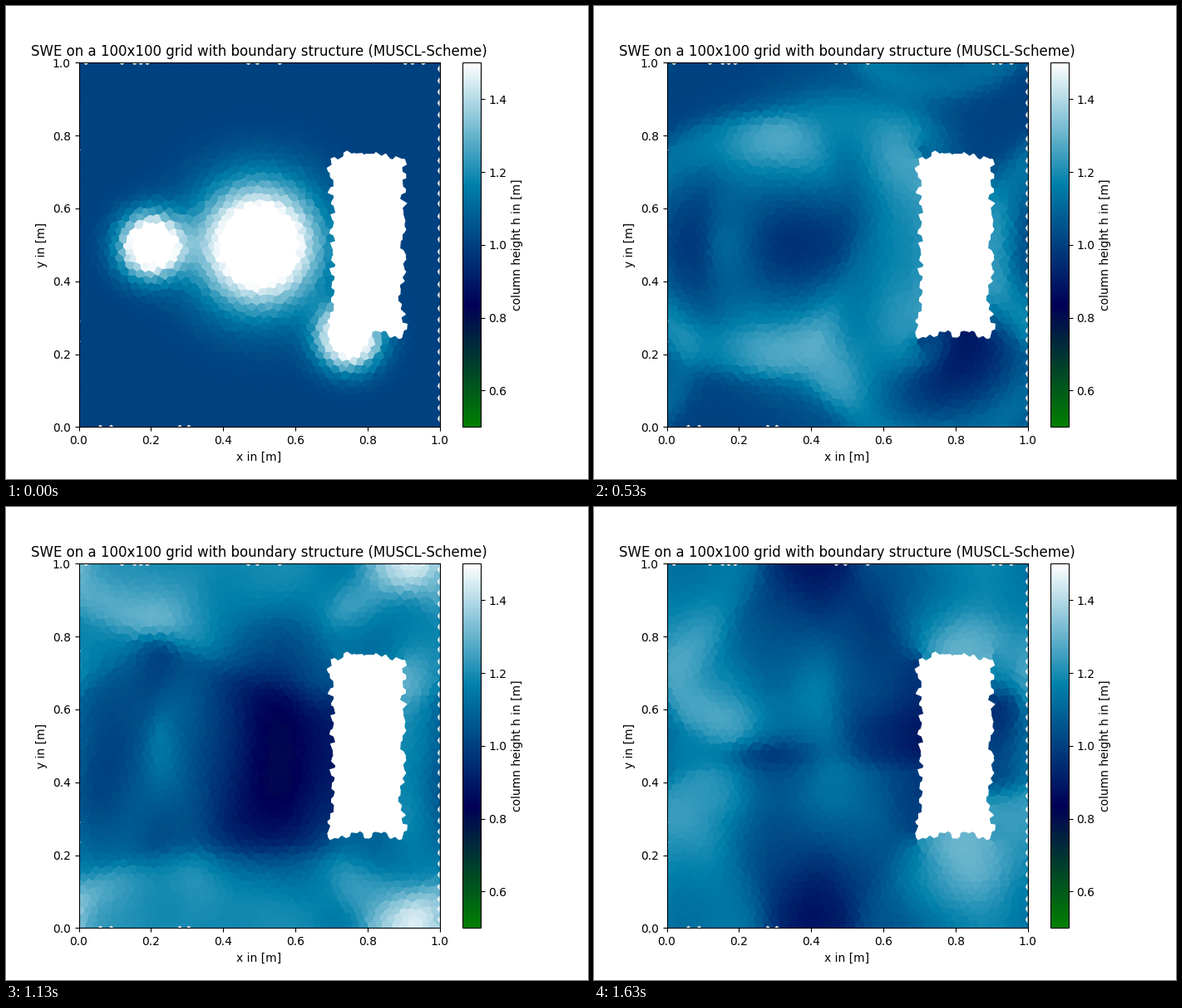
A matplotlib script for the animation above (1660 ms loop, 700 by 570 pixels).

```python
import numpy as np
import matplotlib.pyplot as plt
from matplotlib.animation import FuncAnimation
from matplotlib.collections import PolyCollection

FRAMES, LOOP = 50, 1660
N = 60                      # solver cells per side
SUB = 4                     # solver steps per frame
FRAME_TIME = 0.0146         # travel of a small wave per frame
BOX = (0.7, 0.9, 0.25, 0.75)
rng = np.random.default_rng(7)


def in_box(x, y):
    x0, x1, y0, y1 = BOX
    return (x > x0) & (x < x1) & (y > y0) & (y < y1)


# ---- shallow water solver: periodic sides, reflecting box, g = 1 ----

def minmod(a, b):
    return np.where(a * b > 0, np.where(abs(a) < abs(b), a, b), 0.0)


def flux_diff(h, un, ut, wet, axis):
    """Net outflow of mass, normal and tangential momentum along an axis."""
    def after(q):
        return np.roll(q, -1, axis)

    def before(q):
        return np.roll(q, 1, axis)

    inner = wet & after(wet) & before(wet)
    left, right = [], []
    for q in (h, un, ut):
        s = 0.5 * minmod(after(q) - q, q - before(q)) * inner
        left.append(q + s)
        right.append(after(q - s))
    wall_r = wet & ~after(wet)
    wall_l = ~wet & after(wet)
    for k, sign in enumerate((1, -1, 1)):
        l, r = left[k], right[k]
        left[k] = np.where(wall_l, sign * r, l)
        right[k] = np.where(wall_r, sign * l, r)
    (hl, ul, vl), (hr, ur, vr) = left, right
    a = np.maximum(abs(ul) + np.sqrt(hl), abs(ur) + np.sqrt(hr))
    ml, mr = hl * ul, hr * ur
    fluxes = (
        (ml + mr - a * (hr - hl)) / 2,
        (ml * ul + hl**2 / 2 + mr * ur + hr**2 / 2 - a * (mr - ml)) / 2,
        (ml * vl + mr * vr - a * (hr * vr - hl * vl)) / 2,
    )
    return [f - before(f) for f in fluxes]


def rate(state, wet):
    h, mx, my = state
    u, v = mx / h, my / h
    ax, bx, cx = flux_diff(h, u, v, wet, 1)
    ay, by, cy = flux_diff(h, v, u, wet, 0)
    return -N * wet * np.array([ax + ay, bx + cy, cx + by])


def simulate():
    c = (np.arange(N) + 0.5) / N
    x, y = np.meshgrid(c, c)
    wet = ~in_box(x, y)
    state = np.zeros((3, N, N))
    state[0] = np.where(wet, start_height(x, y), 1.0)
    dt = FRAME_TIME / SUB
    heights = [state[0].copy()]
    for _ in range(FRAMES - 1):
        for _ in range(SUB):
            k1 = rate(state, wet)
            k2 = rate(state + dt * k1, wet)
            state = state + dt * (k1 + k2) / 2
        heights.append(state[0].copy())
    return heights, wet


def start_height(x, y):
    def bump(cx, cy, k):
        return 0.8 * np.exp(-k * ((x - cx)**2 + (y - cy)**2))
    return 1 + bump(0.2, 0.5, 145) + bump(0.5, 0.5, 37) + bump(0.75, 0.25, 145)


def sampler(px, py, wet):
    """Bilinear lookup at the points that ignores the solid box."""
    gx, gy = px * N - 0.5, py * N - 0.5
    ix, iy = np.floor(gx).astype(int), np.floor(gy).astype(int)
    fx, fy = gx - ix, gy - iy
    terms = []
    for dy, wy in ((0, 1 - fy), (1, fy)):
        for dx, wx in ((0, 1 - fx), (1, fx)):
            at = (iy + dy) % N, (ix + dx) % N
            terms.append((at, (wx * wy + 1e-9) * wet[at]))
    total = sum(w for _, w in terms) + 1e-12
    return lambda h: sum(w * h[at] for at, w in terms) / total


# ---- Voronoi mesh ----

def seeds(cols=47, rows=53, jitter=0.32):
    r, c = np.mgrid[0:rows, 0:cols]
    jx, jy = rng.uniform(-jitter, jitter, (2, rows, cols))
    x = (c + 0.25 + 0.5 * (r % 2) + jx) / cols
    y = (r + 0.5 + jy) / rows
    pts = np.column_stack([x.ravel(), y.ravel()])
    return np.clip(pts, 0.002, 0.998)


def clip(poly, nx, ny, d):
    """Keep the part of a polygon where nx*x + ny*y <= d."""
    side = [nx * x + ny * y - d for x, y in poly]
    if max(side) <= 0:
        return poly
    out = []
    for i, (p, s) in enumerate(zip(poly, side)):
        q, t = poly[i - 1], side[i - 1]
        if (s <= 0) != (t <= 0):
            f = t / (t - s)
            out.append((q[0] + f * (p[0] - q[0]), q[1] + f * (p[1] - q[1])))
        if s <= 0:
            out.append(p)
    return out


def voronoi(pts):
    cells = []
    for p in pts:
        dist = ((pts - p)**2).sum(axis=1)
        near = np.argpartition(dist, 18)[:19]
        near = near[np.argsort(dist[near])][1:]
        poly = [(0.0, 0.0), (1.0, 0.0), (1.0, 1.0), (0.0, 1.0)]
        px, py = p.tolist()
        for qx, qy in pts[near].tolist():
            nx, ny = qx - px, qy - py
            d = (qx * qx + qy * qy - px * px - py * py) / 2
            poly = clip(poly, nx, ny, d)
        cells.append(poly)
    return cells


def edge_nicks(depth=0.006):
    """Small gaps where the mesh does not quite reach the border."""
    def nick(x, y, nx, ny, half):
        sx, sy = half * abs(ny), half * abs(nx)
        return [(x - sx, y - sy), (x + depth * nx, y + depth * ny),
                (x + sx, y + sy)]

    nicks = [nick(1, y + rng.uniform(-0.005, 0.005), -1, 0, 0.010)
             for y in np.arange(0.02, 1, 0.031)]
    for x in (0.02, 0.12, 0.155, 0.172, 0.19, 0.47, 0.495, 0.557,
              0.905, 0.925, 0.955):
        nicks.append(nick(x, 1, 0, -1, 0.009))
    for x in (0.06, 0.09, 0.28, 0.305):
        nicks.append(nick(x, 0, 0, 1, 0.007))
    for y in (0.235, 0.29, 0.76):
        nicks.append(nick(0, y, 1, 0, 0.004))
    return nicks


# ---- figure ----

pts = seeds()
keep = ~in_box(pts[:, 0], pts[:, 1])
cells = [c for c, k in zip(voronoi(pts), keep) if k]
px, py = pts[keep].T

heights, wet = simulate()
sample = sampler(px, py, wet)
values = [start_height(px, py)] + [sample(h) for h in heights[1:]]

fig, ax = plt.subplots(figsize=(7, 5.7), dpi=100)
water = PolyCollection(cells, cmap="ocean", edgecolors="face", linewidths=0.7)
water.set_array(values[0])
water.set_clim(0.5, 1.5)
ax.add_collection(water)
ax.add_collection(PolyCollection(edge_nicks(), facecolors="white",
                                 edgecolors="none", zorder=2))
ax.set(xlim=(0, 1), ylim=(0, 1), xlabel="x in [m]", ylabel="y in [m]")
ax.set_title("SWE on a 100x100 grid with boundary structure (MUSCL-Scheme)")
fig.colorbar(water, ax=ax, label="column height h in [m]")


def draw(i):
    water.set_array(values[i])
    return [water]


anim = FuncAnimation(fig, draw, frames=FRAMES, interval=LOOP / FRAMES,
                     repeat=True, repeat_delay=0)
plt.show()
```
